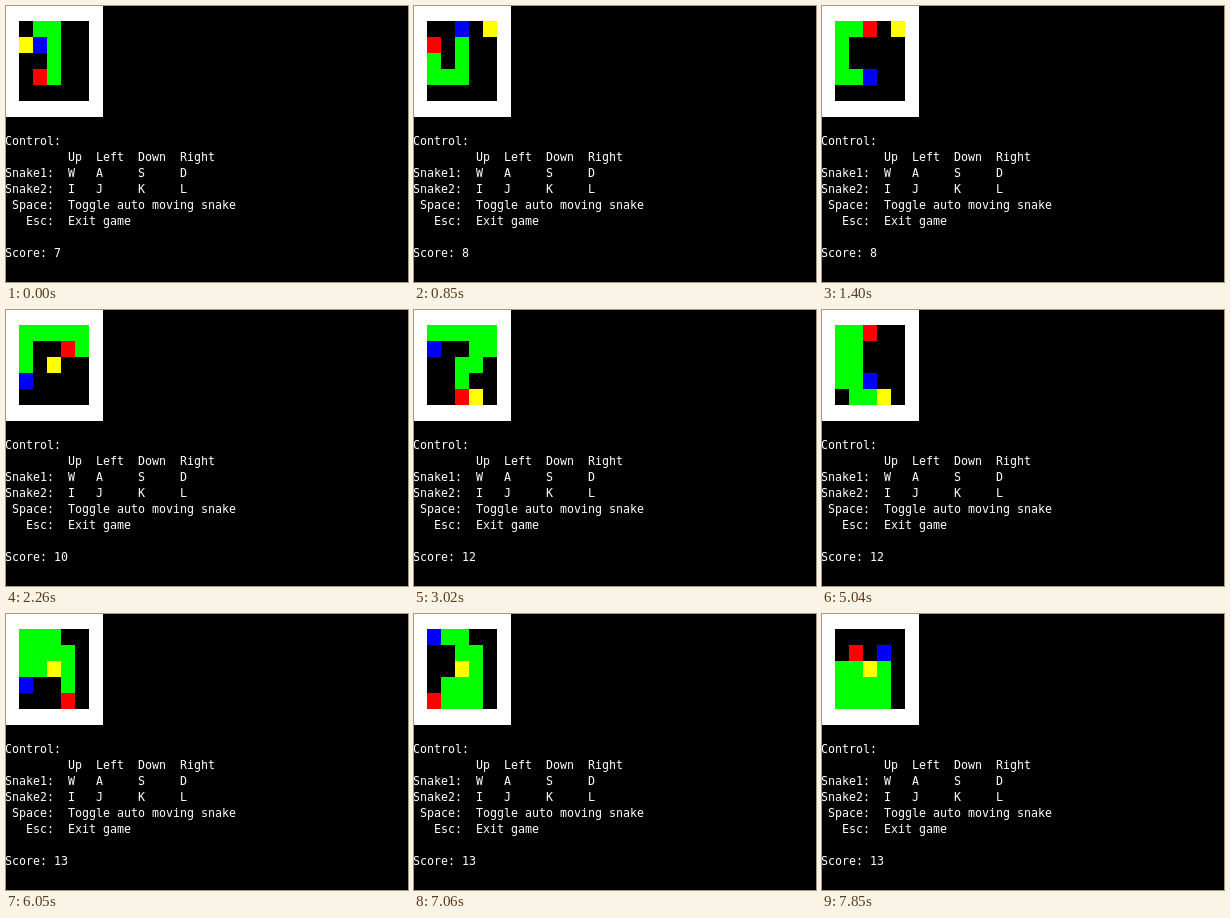
These frames come from a looping animation (402x276 px, 8 s). An HTML page with a canvas:

```html
<!DOCTYPE html>
<html lang="en">
<head>
<meta charset="utf-8">
<title>Console snake</title>
<style>
  html, body { margin: 0; width: 100%; height: 100%; overflow: hidden; background: #000; }
  canvas { position: absolute; left: 0; top: 0; }
  pre {
    position: absolute; left: -1px; top: 127px; margin: 0;
    font: 11.63px/16px "DejaVu Sans Mono", monospace; color: #fff;
  }
</style>
</head>
<body>
<canvas id="board" width="97" height="111"></canvas>
<pre>Control:
         Up  Left  Down  Right
Snake1:  W   A     S     D
Snake2:  I   J     K     L
 Space:  Toggle auto moving snake
   Esc:  Exit game

Score: <span id="score">7</span></pre>
<script>
const LOOP = 8000;
const CELL_W = 14, CELL_H = 16, LEFT = 13, TOP = 15, SIZE = 5;
const STEP = { U: [0, -1], D: [0, 1], L: [-1, 0], R: [1, 0] };

const START = [1, 1];
const START_BODY = 'URDDDL';
const MOVES = 'LUUURR' + 'RRDLDL' + 'DDLULU' + 'RULURR' + 'DRDDDL' + 'ULDLUU' + 'RU';
const MOVE_TIMES = [
  380, 610, 840, 1000, 1230, 1400,
  1630, 1860, 2020, 2250, 2410, 2640,
  2870, 3020, 3250, 3410, 3640, 3800,
  4030, 4260, 4420, 4650, 4810, 5040,
  5270, 5430, 5660, 5820, 6050, 6280,
  6430, 6660, 6820, 7050, 7280, 7450,
  7680, 7850
];
const FOODS = [[0, 1], [4, 0], [3, 1], [2, 2], [2, 4], [3, 4], [2, 2]];

const ctx = document.getElementById('board').getContext('2d');
const scoreText = document.getElementById('score');

const ahead = ([x, y], dir) => [x + STEP[dir][0], y + STEP[dir][1]];
const same = (a, b) => a[0] === b[0] && a[1] === b[1];

// Play the whole game once; bodies run from tail to head.
function playGame() {
  let body = [START];
  for (const dir of START_BODY) body.push(ahead(body.at(-1), dir));
  let eaten = 0;
  const states = [{ body, food: FOODS[0] }];
  for (const dir of MOVES) {
    const head = ahead(body.at(-1), dir);
    const eats = same(head, FOODS[eaten]);
    body = [...body.slice(eats ? 0 : 1), head];
    if (eats) eaten++;
    states.push({ body, food: FOODS[eaten] });
  }
  return states;
}

function fillCell([x, y], color) {
  ctx.fillStyle = color;
  ctx.fillRect(LEFT + x * CELL_W, TOP + y * CELL_H, CELL_W, CELL_H);
}

function draw({ body, food }) {
  ctx.fillStyle = '#fff';
  ctx.fillRect(0, 0, 97, 111);
  ctx.fillStyle = '#000';
  ctx.fillRect(LEFT, TOP, SIZE * CELL_W, SIZE * CELL_H);
  fillCell(food, '#ff0');
  body.forEach(cell => fillCell(cell, '#0f0'));
  fillCell(body[0], '#00f');
  fillCell(body.at(-1), '#f00');
  scoreText.textContent = body.length;
}

const states = playGame();
let shown = -1;

function tick() {
  const time = performance.now() % LOOP;
  const index = MOVE_TIMES.filter(t => t <= time).length;
  if (index !== shown) draw(states[shown = index]);
  requestAnimationFrame(tick);
}
tick();
</script>
</body>
</html>
```
